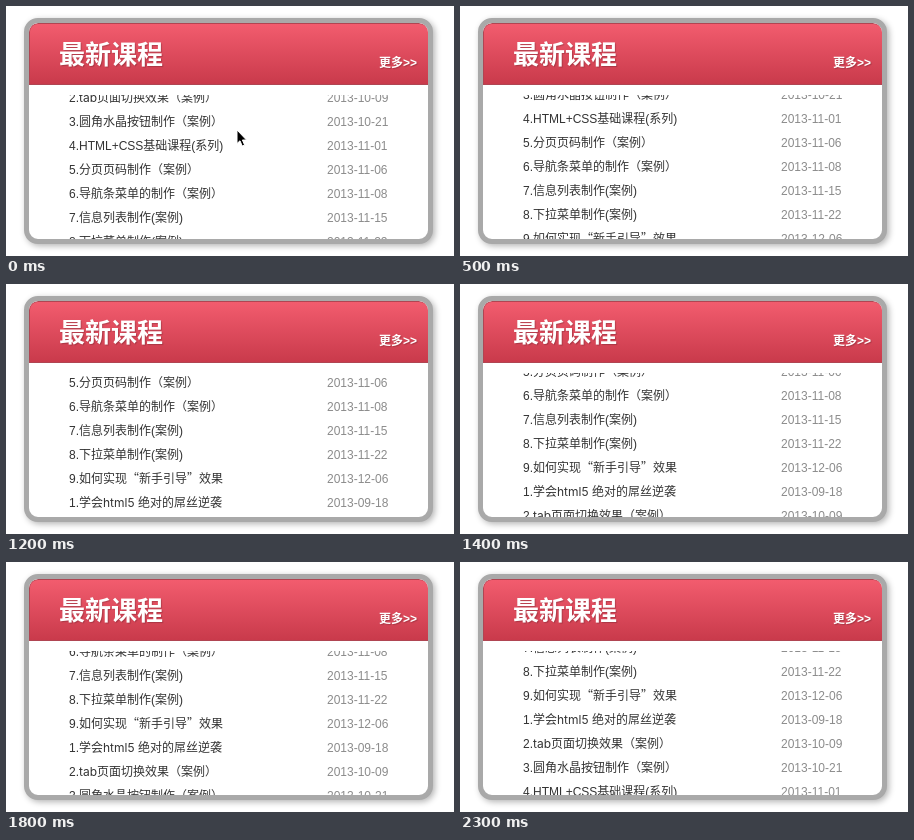
An HTML page for the animation above (2.4 s loop, 448 by 250 pixels).

```html
<!DOCTYPE html>
<html lang="zh-CN">
<head>
<meta charset="utf-8">
<title>最新课程</title>
<style>
html, body { margin: 0; width: 100%; height: 100%; overflow: hidden; background: #fff; }
body { position: relative; font: 12px/24px "Liberation Sans", "Noto Sans CJK SC", "Noto Sans CJK", sans-serif; }
.card {
  position: absolute; left: 18px; top: 12px; width: 399px; height: 216px;
  border: 5px solid #a9a9a9; border-radius: 14px; overflow: hidden;
  background: #fff; box-shadow: 2px 2px 6px #b4b4b4;
}
header {
  box-sizing: border-box; height: 62px; color: #fff; font-weight: bold;
  border: 1px solid #b04552; border-right: 0; border-radius: 9px 9px 0 0;
  background: linear-gradient(#f25c6e, #c93a4b);
  text-shadow: 1px 1px 1px rgba(0, 0, 0, .2);
}
h1 {
  position: absolute; left: 30px; top: 15px; margin: 0; white-space: nowrap;
  font: bold 26px/30px "Noto Sans CJK SC", "Noto Sans CJK", sans-serif;
}
.more { position: absolute; left: 350px; top: 33px; line-height: 14px; white-space: nowrap; }
.view { position: absolute; left: 40px; top: 72px; width: 330px; height: 144px; overflow: hidden; }
ul { margin: 0; padding: 0; list-style: none; }
li { position: relative; height: 24px; white-space: nowrap; color: #333; }
time { position: absolute; left: 258px; top: 0; color: #8c8c8c; }
b, i { font-weight: normal; font-style: normal; line-height: 0; }
b { font-family: Inter, sans-serif; }
i { font-family: "Noto Sans CJK SC", "Noto Sans CJK", sans-serif; }
svg { position: absolute; left: 230px; top: 123px; }
</style>
</head>
<body>
<div class="card">
  <header><h1>最新课程</h1><span class="more">更多&gt;&gt;</span></header>
  <div class="view"><ul id="list"></ul></div>
</div>
<svg id="cursor" width="14" height="20">
  <path d="M1 1V14.5L4 11.8L6.2 17L8.6 16L6.4 11H10.5Z" stroke="#fff"/>
</svg>
<script>
const courses = [
  ["学会html5 绝对的屌丝逆袭", "09-18"],
  ["tab页面切换效果（案例）", "10-09"],
  ["圆角水晶按钮制作（案例）", "10-21"],
  ["HTML+CSS基础课程(系列)", "11-01"],
  ["分页页码制作（案例）", "11-06"],
  ["导航条菜单的制作（案例）", "11-08"],
  ["信息列表制作(案例)", "11-15"],
  ["下拉菜单制作(案例)", "11-22"],
  ["如何实现“新手引导”效果", "12-06"]
];
const LOOP = 2400, STEP = 100, START = 33, SPEED = 5.457;
const list = document.getElementById("list");
const cursor = document.getElementById("cursor");

// Lowercase words and curly quotes each get their own font
const markup = text => text
  .replace(/[a-z]+5?/g, "<b>$&</b>")
  .replace(/[“”]/g, "<i>$&</i>");

const rows = courses.map(([name, day], i) =>
  `<li>${i + 1}.${markup(name)}<time>2013-${day}</time></li>`).join("");
list.innerHTML = rows + rows;

function draw(now) {
  const tick = Math.floor(now % LOOP / STEP);
  list.style.transform = `translateY(${-START - Math.round(tick * SPEED)}px)`;
  cursor.style.visibility = tick ? "hidden" : "visible";
}

const begin = performance.now();
function frame() {
  draw(performance.now() - begin);
  requestAnimationFrame(frame);
}
frame();
</script>
</body>
</html>
```
